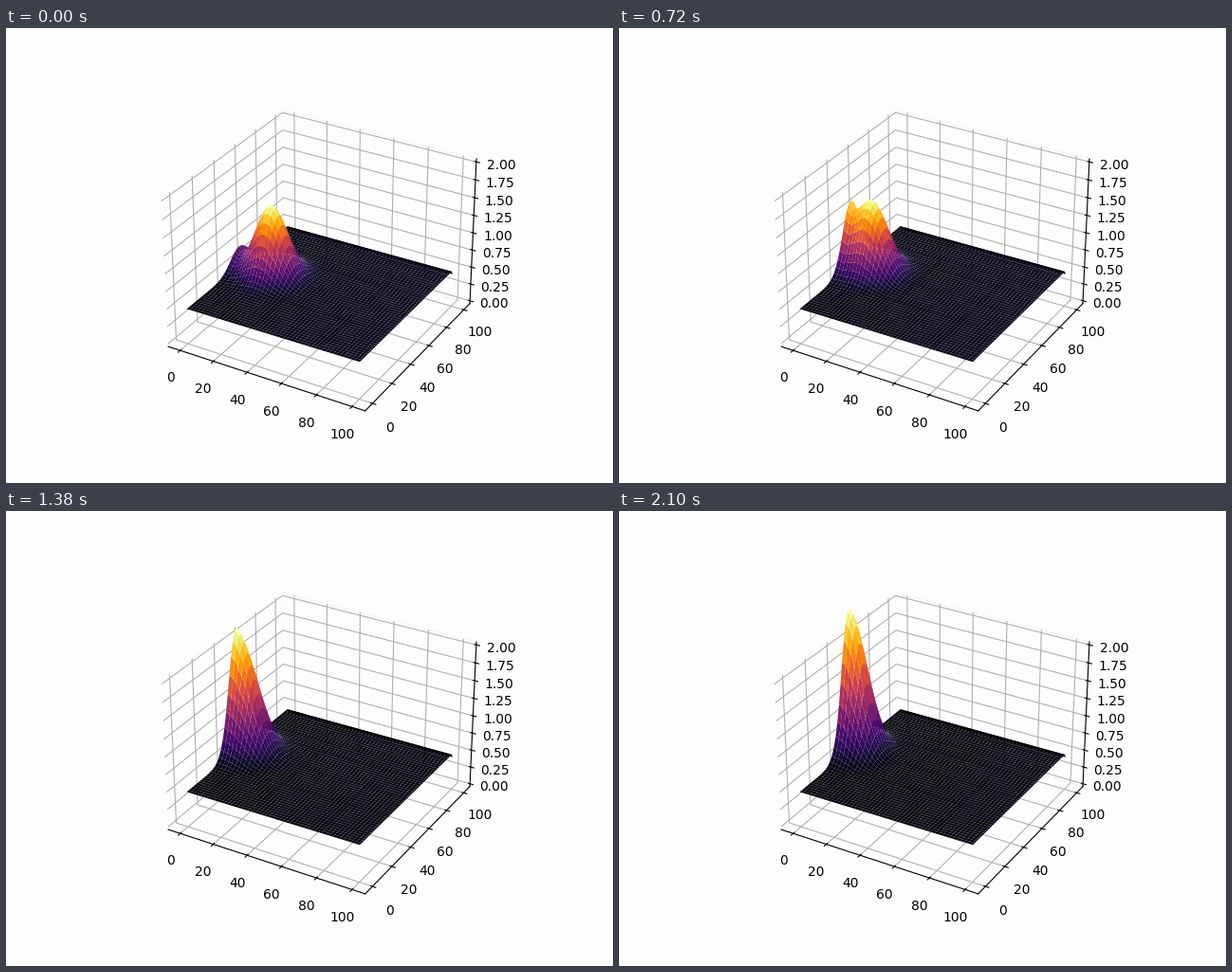
A matplotlib script for the animation above (2160 ms loop, 640 by 480 pixels).

```python
import numpy as np
import matplotlib.pyplot as plt
from matplotlib.animation import FuncAnimation

FRAMES, INTERVAL = 36, 60
WIDTH = 8.5
START, SPEED = 20, 0.62
PAPER = "#fdfdfd"

axis = np.linspace(0, 100, 100)
X, Y = np.meshgrid(axis, axis)


def bell(v, width):
    return np.exp(-v ** 2 / (2 * width ** 2))


def height(i):
    """Pulse running into the wall at x = 0, its echo and a crest at the wall."""
    cx = START - SPEED * i
    crest = 0.27 * bell(i - 10.5, 10) * np.exp(-X / 4)
    wave = bell(X - cx, WIDTH) + bell(X + cx, WIDTH) + crest
    z = 0.465 + 0.0002 * X + wave * bell(Y - 50, WIDTH)
    z[-1] -= 0.05  # the far rim hangs down
    return z


fig = plt.figure(figsize=(6.4, 4.8), dpi=100, facecolor=PAPER)
ax = fig.add_subplot(projection="3d", facecolor=PAPER)

pad = 1 / 48
ax.set_xlim(-5, 105, view_margin=pad)
ax.set_ylim(-5, 105, view_margin=pad)
ax.set_zlim(0, 2, view_margin=pad)
ax.set_xticks(range(0, 101, 20))
ax.set_yticks(range(0, 101, 20))
ax.set_zticks(np.arange(0, 2.01, 0.25))

for a, edge in ((ax.xaxis, "#f6f6f6"), (ax.yaxis, "#efefef"), (ax.zaxis, "#f3f3f3")):
    a.pane.set_facecolor(PAPER)
    a.pane.set_edgecolor(edge)

surface = None


def draw(i):
    global surface
    if surface is not None:
        surface.remove()
    surface = ax.plot_surface(X, Y, height(i), cmap="inferno")
    return (surface,)


anim = FuncAnimation(fig, draw, frames=FRAMES, interval=INTERVAL,
                     init_func=lambda: (), repeat=True, repeat_delay=0)
plt.show()
```
